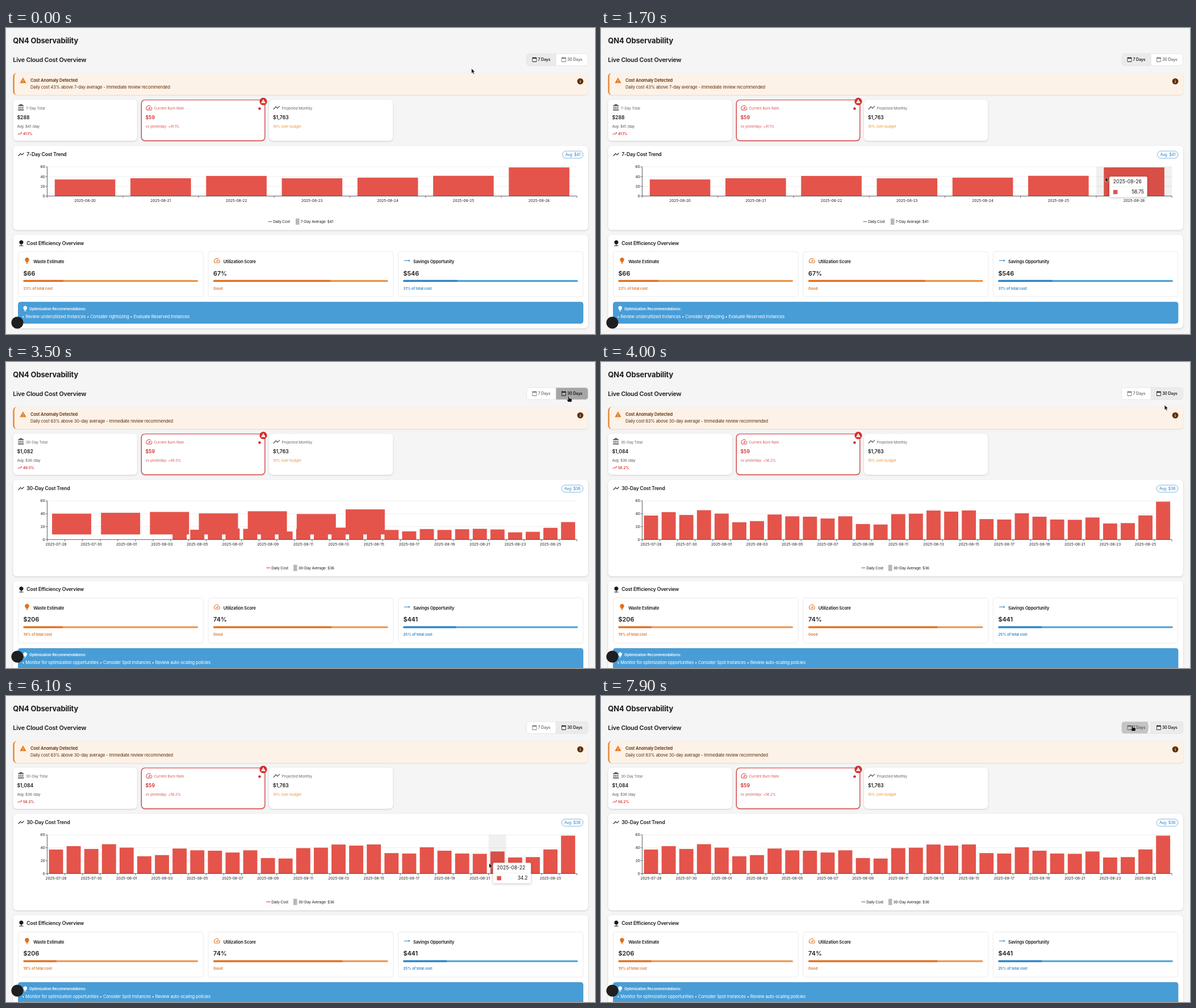
These frames come from a looping animation (1037 px wide and 540 px high, 8 s). An HTML page:

```html
<!DOCTYPE html>
<html lang="en">
<head>
<meta charset="utf-8">
<title>Cost dashboard</title>
<style>
  html, body { margin: 0; width: 100%; height: 100%; overflow: hidden; background: #f5f5f5; }
  svg { display: block; width: 1037px; height: 540px; font-family: Inter, sans-serif; }
  .card { fill: #fff; filter: drop-shadow(0 1px 1.5px rgba(0, 0, 0, .16)); }
  .tip { fill: #fff; filter: drop-shadow(0 1px 2px rgba(0, 0, 0, .25)); }
</style>
</head>
<body>
<svg id="stage" viewBox="0 0 1037 540"></svg>
<script>
const INK = '#1c1c1c', GREY = '#666', RED = '#d32f2f', BAR = '#e4544b', ORANGE = '#e0701f', BLUE = '#2a84c8';
const LOOP = 8000, STEP = 100;
const CLICK = 3100, TOGGLE = 3300, SWITCH = 3354, REFRESH = 3650, CLICK_BACK = 7800;
const LEFT = 72.5, SPAN = 932.7, TOP = 245;

const ICONS = {
  bank: 'M4 10v7h3v-7H4zm6 0v7h3v-7h-3zM2 22h19v-3H2v3zm14-12v7h3v-7h-3zm-4.5-9L2 6v2h19V6l-9.5-5z',
  speed: 'M20.38 8.57l-1.23 1.85a8 8 0 0 1-.22 7.58H5.07A8 8 0 0 1 15.58 6.85l1.85-1.23A10 10 0 0 0 3.35 19a2 2 0 0 0 1.72 1h13.85a2 2 0 0 0 1.74-1 10 10 0 0 0-.27-10.44zM10.59 15.41a2 2 0 0 0 2.83 0l5.66-8.49-8.49 5.66a2 2 0 0 0 0 2.83z',
  warn: 'M1 21h22L12 2 1 21zm12-3h-2v-2h2v2zm0-4h-2v-4h2v4z',
  info: 'M12 2a10 10 0 1 0 0 20 10 10 0 1 0 0-20zm1 15h-2v-6h2v6zm0-8h-2V7h2v2z',
  bulb: 'M9 21c0 .55.45 1 1 1h4c.55 0 1-.45 1-1v-1H9v1zm3-19a7 7 0 0 0-4 12.74V17c0 .55.45 1 1 1h6c.55 0 1-.45 1-1v-2.26A7 7 0 0 0 12 2z',
  rise: 'M16 6l2.29 2.29-4.88 4.88-4-4L2 16.59 3.41 18l6-6 4 4 6.3-6.29L22 12V6z',
  date: 'M20 3h-1V1h-2v2H7V1H5v2H4c-1.1 0-2 .9-2 2v16c0 1.1.9 2 2 2h16c1.1 0 2-.9 2-2V5c0-1.1-.9-2-2-2zm0 18H4V8h16v13z',
  arrow: 'M22 12l-4-4v3H3v2h15v3z',
  tree: 'M13 16.12a7 7 0 1 0-2-.06V20H5v2h14v-2h-6z',
  line: 'M2 17.5L9.5 9.5l5.5 5 6.5-6.5M2 17.5h.01M9.5 9.5h.01M15 14.5h.01M21.5 8h.01'
};

const week = [34.1, 36.6, 41.3, 36.5, 37.8, 41.64, 58.75];
const month = [37.2, 42.5, 38.1, 45.5, 40.2, 26.8, 28.6, 38.8, 36, 35.4, 32.6, 36, 24, 23.3, 39.4,
  40.1, 45, 43.3, 45.1, 31.7, 31, 40.7, 35.4, 31, 30.6, 34.2, 24.9, 25.5, 37.4, 58.75];
const monthFirst = [39.8, 40.5, 39.2, 38.6, 44.6, 31.9, 32.4, 38.8, 33, 35.4, 37, 36, 24, 27, 36,
  40.1, 40, 43.3, 45.1, 32.3, 27.5, 35.2, 32.3, 34.6, 36, 33.9, 24.2, 26, 39.35, 58.75];

// Pointer waypoints: time, x, y
const path = [[400, 819.5, 71.5], [800, 846, 135], [1300, 896, 261], [1600, 896, 261], [1700, 888, 263],
  [1900, 833, 267], [2100, 868, 205], [2500, 936, 61], [2600, 936, 61], [2700, 968, 63], [2900, 989.5, 60],
  [3900, 989.5, 60], [4400, 1003, 140], [4800, 997, 219], [5000, 995, 255], [5200, 993, 274], [5500, 956, 288],
  [5800, 907, 290], [6100, 850.5, 295], [6400, 818, 287], [6700, 814, 279], [7000, 921, 146],
  [7100, 921, 146], [7600, 934.5, 51.5], [8000, 934.5, 51.5]];

const clamp = v => Math.max(0, Math.min(1, v));
const mix = (a, b, p) => a + (b - a) * p;
const ease = u => u < .5 ? 4 * u ** 3 : 1 - 4 * (1 - u) ** 3;

const text = (x, y, s, size, { fill = INK, weight = 400, anchor = 'start', gap = -.02 } = {}) =>
  `<text x="${x}" y="${y}" font-size="${size}" fill="${fill}" font-weight="${weight}" text-anchor="${anchor}" letter-spacing="${gap}em">${s}</text>`;
const rect = (x, y, w, h, fill, extra = '') =>
  `<rect x="${x}" y="${y}" width="${w}" height="${h}" fill="${fill}" ${extra}/>`;
const card = (x, y, w, h) => `<rect class="card" x="${x}" y="${y}" width="${w}" height="${h}" rx="6.5"/>`;
const stroke = (d, color, width = .6) => `<path d="${d}" fill="none" stroke="${color}" stroke-width="${width}"/>`;
const icon = (name, x, y, fill, size = 13) => {
  const paint = name === 'line'
    ? `fill="none" stroke="${fill}" stroke-width="2.4" stroke-linecap="round" stroke-linejoin="round"`
    : `fill="${fill}"`;
  return `<path transform="translate(${x} ${y}) scale(${size / 24})" d="${ICONS[name]}" ${paint}/>`;
};

function pointer(t) {
  if (t <= path[0][0]) return path[0].slice(1);
  const i = path.findIndex(k => k[0] >= t);
  const [t0, x0, y0] = path[i - 1], [t1, x1, y1] = path[i];
  const p = (t - t0) / (t1 - t0);
  return [mix(x0, x1, p), mix(y0, y1, p)];
}

function bars(values, base) {
  const band = SPAN / values.length;
  return values.map((v, i) => {
    const h = v / 60 * (base - TOP);
    return { x: LEFT + band * (i + .1), y: base - h, w: band * .8, h };
  });
}

const blend = (from, to, p) => to.map((b, i) => {
  const a = from[i] || { ...b, y: b.y + b.h, h: 0 };
  return { x: mix(a.x, b.x, p), y: mix(a.y, b.y, p), w: mix(a.w, b.w, p), h: mix(a.h, b.h, p) };
});

function ripple(t, start, x, y, clip, alpha) {
  const age = t - start;
  if (age < 0 || age > 850) return '';
  const fade = 1 - clamp((age - 450) / 400);
  return `<circle cx="${x}" cy="${y}" r="${Math.min(60, 8 + age * .19)}" fill="#000" opacity="${alpha * fade}" clip-path="url(#${clip})"/>`;
}

function header(t, mx, my) {
  const second = t >= TOGGLE;
  const over = my > 45 && my < 67 ? (mx < 968.5 ? 0 : 1) : -1;
  const button = (i, x, w, label, clip) => {
    const on = second === (i === 1), hover = over === i;
    const bg = on ? (hover ? '#e0e0e0' : '#ebebeb') : (hover ? '#f5f5f5' : '#fff');
    const ink = on ? '#222' : '#757575';
    return rect(x, 45.3, w, 21, bg, `clip-path="url(#${clip})"`) + icon('date', x + 9, 50.8, ink, 9.5) +
      text(x + 19.8, 58.3, label, 7.02, { fill: ink, weight: 600 });
  };
  return text(12.3, 26.6, 'QN4 Observability', 12.96, { weight: 700, gap: -.01 }) +
    text(12.3, 59.7, 'Live Cloud Cost Overview', 10.8, { weight: 600 }) +
    button(0, 916.7, 51.5, '7 Days', 'left') + button(1, 968.2, 56.5, '30 Days', 'right') +
    ripple(t, CLICK, 990, 61, 'right', .26) + ripple(t, CLICK_BACK, 937, 55, 'left', .2) +
    rect(916.7, 45.3, 108, 21, 'none', 'rx="4.5" stroke="#dcdcdc" stroke-width=".6"') + stroke('M968.2 45.3v21', '#dcdcdc');
}

function alertBox(days) {
  return rect(12.5, 79.5, 1012.5, 38.5, '#fdf2e8', 'rx="6" filter="drop-shadow(0 1px 1px rgba(0,0,0,.1))"') +
    '<path d="M18.5 79.5a6 6 0 0 0-6 6v26.5a6 6 0 0 0 6 6q-3.8-1.5-3.8-6v-26.5q0-4.5 3.8-6z" fill="#e67e22"/>' +
    icon('warn', 23.7, 86.3, '#e67e22', 12.5) + icon('info', 1004.6, 87.6, '#5f2f08') +
    text(43, 95.2, 'Cost Anomaly Detected', 7.56, { weight: 600, fill: '#5f2f08' }) +
    text(43, 107.3, `Daily cost ${days > 7 ? 63 : 43}% above ${days}-day average - Immediate review recommended`, 7.56, { fill: '#5f2f08' });
}

function metrics(days, fresh) {
  const big = days > 7;
  const change = big ? (fresh ? '56.2%' : '49.3%') : '41.1%';
  const total = big ? (fresh ? '$1,084' : '$1,082') : '$288';
  const num = { weight: 600, gap: 0 };
  return [12.5, 238, 463].map(x => card(x, 126.5, 218.3, 72.5)).join('') +
    icon('bank', 20, 133.5, '#555') + text(35, 143.6, `${days}-Day Total`, 6.48, { fill: GREY }) +
    text(19.5, 160.7, total, 8.64, num) +
    text(19.5, 175.5, `Avg: $${big ? 36 : 41} /day`, 6.48, { fill: '#555' }) +
    icon('rise', 19.6, 182, RED, 9) + text(30, 188.6, change, 6.35, { fill: RED, weight: 600 }) +
    rect(238.4, 127, 217.4, 71.8, 'none', `rx="6" stroke="${RED}" stroke-width="1.2"`) +
    icon('speed', 245.4, 134.3, '#dc5a58') + text(260.5, 144, 'Current Burn Rate', 6.48, { fill: '#dc5a58' }) +
    text(245.5, 161.4, '$59', 8.64, { ...num, fill: RED }) +
    text(245.5, 175.9, `vs yesterday: +${change}`, 6.3, { fill: '#dc5a58' }) +
    `<circle cx="446.5" cy="142.2" r="2.3" fill="${RED}"/><circle cx="453" cy="129.7" r="6.6" fill="${RED}"/>` +
    icon('warn', 448.6, 124.9, '#fff', 8.8) +
    icon('line', 470, 133.8, '#555') + text(485.5, 143.6, 'Projected Monthly', 6.48, { fill: GREY }) +
    text(470, 160.7, '$1,763', 8.64, num) + text(470, 175.5, '18% over budget', 6.48, { fill: '#ee963c' });
}

function chart(t, days, dy, mx, my) {
  const big = days > 7, base = big ? 313.3 : 296.6, band = SPAN / days;
  const start = Date.UTC(2025, 7, 27 - days);
  const day = i => new Date(start + i * 864e5).toISOString().slice(0, 10);
  let shapes = bars(week, 296.6);
  if (big) {
    shapes = blend(shapes, bars(monthFirst, base), ease(clamp((t - SWITCH) / 300)));
    if (t >= REFRESH) shapes = blend(shapes, bars(month, base), ease(clamp((t - REFRESH) / 300)));
  }
  let s = card(12.5, 208, 1012.5, 148.5 + dy) + icon('line', 21, 217, INK, 11.5) +
    text(36.3, 226.4, `${days}-Day Cost Trend`, 8.64, { weight: 600 }) +
    rect(big ? 978.3 : 979.6, 217.2, big ? 37.7 : 36.4, 12.6, '#fff', `rx="6.3" stroke="${BLUE}" stroke-width=".6"`) +
    text(big ? 997.2 : 998, 226, `Avg: $${big ? 36 : 41}`, 7.02, { fill: BLUE, anchor: 'middle' });

  for (let v = 0; v <= 60; v += 20) {
    const y = mix(base, TOP, v / 60);
    if (v) s += stroke(`M${LEFT} ${y}h${SPAN}`, '#e2e2e2');
    s += stroke(`M${LEFT - 3.2} ${y}h3.2`, INK) + text(68.7, y + 2.4, v, 6.48, { anchor: 'end', gap: 0 });
  }
  s += shapes.map(b => rect(b.x, b.y, b.w, b.h, BAR)).join('');
  s += stroke(`M${LEFT} ${TOP}V${base}h${SPAN}`, INK, .7);
  for (let i = 0; i <= days; i++) {
    const x = LEFT + band * i;
    s += stroke(`M${x} ${base}v3.2`, INK);
    if (i < days && !(big && i % 2)) s += text(x + band / 2, base + 10.6, day(i), 6.48, { anchor: 'middle', gap: 0 });
  }

  const lx = big ? 458.5 : 461.5, ly = 341.6 + dy, gx = big ? 506 : 510;
  s += stroke(`M${lx} ${ly}h6.8`, BAR, 1.3) + text(lx + 8.7, ly + 2.3, 'Daily Cost', 6.48) +
    rect(gx, ly - 5.4, 6.5, 11, '#b8b8b8') + text(gx + 8.7, ly + 2.3, `${days}-Day Average: $${big ? 36 : 41}`, 6.48);

  let tip = '';
  if (mx > LEFT && mx < LEFT + SPAN && my > TOP && my < base) {
    const i = Math.floor((mx - LEFT) / band);
    const x = mx + 74 > 1037 ? mx - 70 : mx + 7, y = my - .8;
    s += rect(LEFT + band * i, TOP, band, base - TOP, '#000', 'opacity=".06"');
    tip = `<rect class="tip" x="${x}" y="${y}" width="66.7" height="36.3" rx="2.5"/>` +
      text(x + 6.8, y + 12, day(i), 8.64, { gap: 0 }) + stroke(`M${x} ${y + 18}h66.7`, '#e4e4e4') +
      rect(x + 6.8, y + 23.5, 7.6, 7.6, BAR, 'rx="1"') +
      text(x + 60.8, y + 30.2, (big ? month : week)[i], 8.64, { anchor: 'end' });
  }
  return [s, tip];
}

function efficiency(t, days, dy) {
  const big = days > 7, p = clamp((t - 3460) / 400);
  const part = (a, b) => mix(a, b, p);
  const panels = [
    [21.5, 'bulb', 'Waste Estimate', big ? '$206' : '$66', big ? '19% of total cost' : '23% of total cost', part(.23, .19), ORANGE, '#ed9145'],
    [356, 'speed', 'Utilization Score', big ? '74%' : '67%', 'Good', part(.67, .74), ORANGE, '#ed9145'],
    [690.3, 'arrow', 'Savings Opportunity', big ? '$441' : '$546', big ? '25% of total cost' : '31% of total cost', part(.31, .25), BLUE, '#4a9fd9']
  ];
  const advice = big
    ? '• Monitor for optimization opportunities • Consider Spot Instances • Review auto-scaling policies'
    : '• Review underutilized Instances • Consider rightsizing • Evaluate Reserved Instances';
  return `<g transform="translate(0 ${dy})">` + card(12.5, 365, 1012.5, 165) +
    icon('tree', 20.6, 373.3, INK, 12.5) + text(36.3, 382.8, 'Cost Efficiency Overview', 8.64, { weight: 600 }) +
    panels.map(([x, pic, title, value, note, share, dark, light]) =>
      rect(x, 394.6, 325.7, 79.7, '#fff', 'rx="4" stroke="#e2e2e2" stroke-width=".7"') +
      icon(pic, x + 9, 404, dark) + text(x + 26.7, 415, title, 7.56, { weight: 600 }) +
      text(x + 9.1, 436.7, value, 10.8, { weight: 600, gap: 0 }) +
      rect(x + 9.1, 444.7, 307.5, 3.2, light, 'rx="1.6"') + rect(x + 9.1, 444.7, 307.5 * share, 3.2, dark, 'rx="1"') +
      text(x + 9.1, 461.6, note, 6.48, { fill: dark, weight: 600 })).join('') +
    rect(21.5, 483.7, 994.5, 37.5, '#489dd7', 'rx="4" stroke="#2f86c4" stroke-width=".7"') +
    icon('bulb', 28, 489.5, '#fff', 11.5) +
    text(41, 497.6, 'Optimization Recommendations:', 6.6, { fill: '#fff', weight: 600 }) +
    text(28.3, 511.6, advice, 7.56, { fill: '#fff' }) + '</g>';
}

function cursor(x, y) {
  const hand = x > 916 && y > 45 && y < 67;
  const d = hand
    ? 'M-1 .8Q0-.5 1 .8V4l4 .8q1.2.4 1 1.7l-.8 4H-.8L-3 7Q-3.2 6-2.2 6L-1 7z'
    : 'M0 0v8.6L2 6.8l1.4 3.1 1.5-.7L3.5 6.1H6.2z';
  return `<path transform="translate(${x + (hand ? 1 : 0)} ${y})" d="${d}" fill="#111" stroke="#fff" stroke-width=".5"/>`;
}

function scene(t) {
  const [mx, my] = pointer(t);
  const days = t >= SWITCH ? 30 : 7, dy = days > 7 ? 21.7 : 0;
  const [plot, tip] = chart(t, days, dy, mx, my);
  return '<defs><clipPath id="left"><path d="M968.2 45.3h-47a4.5 4.5 0 0 0-4.5 4.5v12a4.5 4.5 0 0 0 4.5 4.5h47z"/></clipPath>' +
    '<clipPath id="right"><path d="M968.2 45.3h52a4.5 4.5 0 0 1 4.5 4.5v12a4.5 4.5 0 0 1-4.5 4.5h-52z"/></clipPath></defs>' +
    header(t, mx, my) + alertBox(days) + metrics(days, t >= REFRESH) + plot + efficiency(t, days, dy) +
    '<circle cx="20" cy="520" r="10.6" fill="#1f1f1f"/>' + tip + cursor(mx, my);
}

const stage = document.getElementById('stage');
const origin = performance.now();
let shown = -1;
function draw() {
  const t = Math.floor((performance.now() - origin) % LOOP / STEP) * STEP;
  if (t !== shown) stage.innerHTML = scene(shown = t);
  requestAnimationFrame(draw);
}
draw();
</script>
</body>
</html>
```
